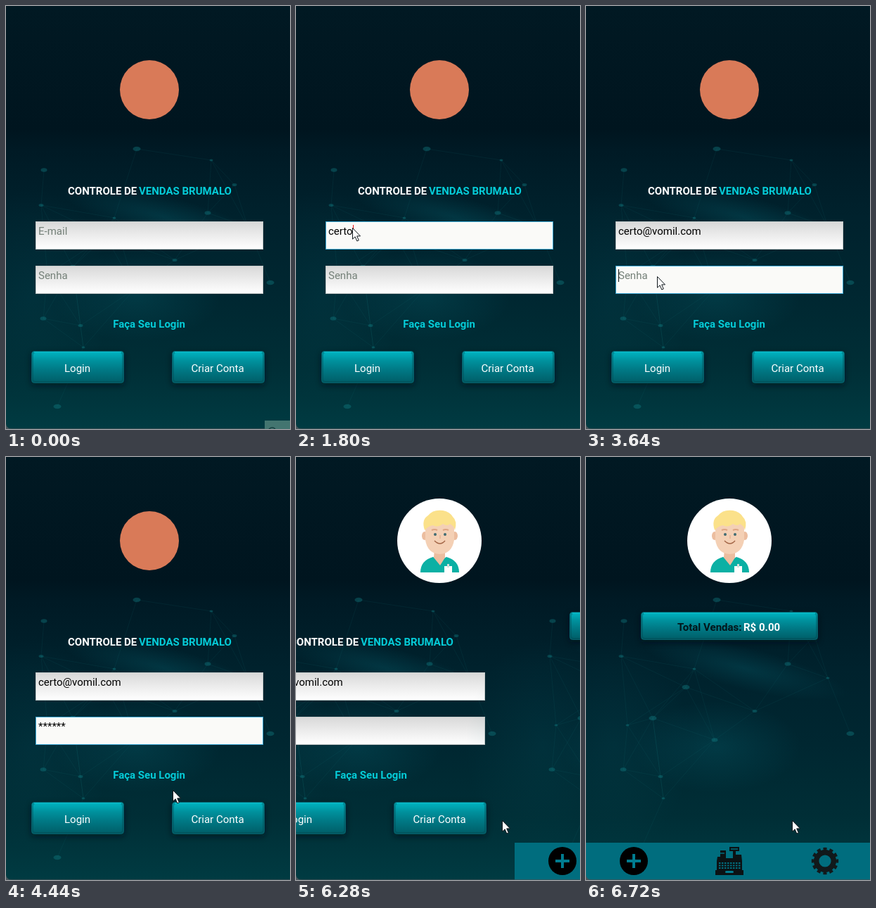
An HTML page for the animation above (6.84 s loop, 404 by 601 pixels).

```html
<!DOCTYPE html>
<html lang="pt-BR">
<head>
<meta charset="utf-8">
<title>Controle de Vendas</title>
<style>
  html, body { margin: 0; width: 100%; height: 100%; overflow: hidden; background: #001822; }
  svg { display: block; width: 404px; height: 601px; font: 15px Roboto, sans-serif; }
  text { white-space: pre; }
  .bold { font-weight: 700; }
  .mid { text-anchor: middle; }
  .cyan { fill: #05ccd8; }
  .white { fill: #fff; }
  .hint { fill: #748078; }
  .field { fill: url(#fieldFill); stroke: #c4c8c8; }
  .field.focus { fill: #fafaf8; stroke: #41acd9; }
  .face { fill: url(#teal); stroke: #07606b; }
  .pressed .face { fill: url(#dim); stroke: #2a5f60; }
  .pressed .shine { stroke: #4a8784; }
  .shine { fill: none; stroke: #08c5d3; stroke-width: 2; opacity: .75; }
  .edge { fill: none; stroke: #00464f; stroke-width: 2; opacity: .35; }
</style>
</head>
<body>
<svg viewBox="0 0 404 601">
  <defs>
    <linearGradient id="night" x2="0" y2="1">
      <stop stop-color="#011923"/><stop offset=".29" stop-color="#00151f"/>
      <stop offset=".34" stop-color="#001a25"/><stop offset=".5" stop-color="#00222d"/>
      <stop offset=".68" stop-color="#002731"/><stop offset=".85" stop-color="#002e36"/>
      <stop offset="1" stop-color="#003b42"/>
    </linearGradient>
    <radialGradient id="glow">
      <stop stop-color="#06606e" stop-opacity=".32"/><stop offset="1" stop-color="#06606e" stop-opacity="0"/>
    </radialGradient>
    <linearGradient id="fieldFill" x2="0" y2="1">
      <stop stop-color="#d8d8d8"/><stop offset=".5" stop-color="#ececec"/><stop offset="1" stop-color="#fff"/>
    </linearGradient>
    <linearGradient id="teal" x2="0" y2="1">
      <stop stop-color="#00b4c2"/><stop offset=".14" stop-color="#00a5b2"/>
      <stop offset=".3" stop-color="#00919d"/><stop offset=".6" stop-color="#007884"/>
      <stop offset="1" stop-color="#005d67"/>
    </linearGradient>
    <linearGradient id="dim" x2="0" y2="1">
      <stop stop-color="#427d7b"/><stop offset=".3" stop-color="#346463"/><stop offset="1" stop-color="#1f4445"/>
    </linearGradient>
    <filter id="soft" x="-10%" y="-30%" width="120%" height="160%"><feGaussianBlur stdDeviation="4"/></filter>
    <g id="backdrop">
      <rect width="408" height="601" fill="url(#night)"/>
      <ellipse cx="185" cy="412" rx="120" ry="65" fill="url(#glow)"/>
      <ellipse cx="225" cy="300" rx="150" ry="30" fill="url(#glow)" transform="rotate(14 225 300)"/>
      <ellipse cx="40" cy="410" rx="110" ry="150" fill="url(#glow)" opacity=".5"/>
      <g id="web" stroke="#1b7d82" stroke-width=".7"></g>
    </g>
  </defs>

  <g id="login">
    <use href="#backdrop"/>
    <text class="bold white" x="88" y="268">CONTROLE DE</text>
    <text class="bold cyan" x="189" y="268">VENDAS BRUMALO</text>
    <rect id="mailBox" class="field" x="42.5" y="306.5" width="323" height="39"/>
    <text id="mail" x="46" y="325"></text>
    <rect id="mailCaret" y="311" width="1" height="18" fill="#f01818"/>
    <rect id="passBox" class="field" x="42.5" y="369.5" width="323" height="39"/>
    <text id="pass" x="46" y="388"></text>
    <rect id="passCaret" y="374" width="1" height="18" fill="#111"/>
    <text class="bold cyan mid" x="203.5" y="457">Faça Seu Login</text>
    <g class="button" data-box="36 490 132 46"></g>
    <text class="white mid" x="101.5" y="520">Login</text>
    <g class="button" id="create" data-box="236 490 132 46"></g>
    <text class="white mid" x="301" y="520">Criar Conta</text>
  </g>

  <g id="home">
    <use href="#backdrop"/>
    <g class="button" data-box="78 220 252 40"></g>
    <text class="bold" x="130" y="247" fill="#02161b">Total Vendas:</text>
    <text class="bold white" x="224" y="247">R$ 0.00</text>
    <rect y="548" width="408" height="53" fill="#006d7e"/>
    <circle cx="68" cy="574" r="20"/>
    <path d="M58 574h20M68 564v20" stroke="#007c8f" stroke-width="4"/>
    <g fill="#0b1214">
      <path d="M204 554h14v6h-5v5h8l1 9v13h2v7h-40v-7h2v-13l1-6h4v-9h8v11h10v-10h-5z"/>
      <path d="M191 563h6M206 557h10" stroke="#006d7e" stroke-width="1.4"/>
      <path d="M189 577h31M189 580.5h31M189 584h31" stroke="#006d7e" stroke-width="2" stroke-dasharray="2.5 1.5"/>
      <rect x="198" y="588" width="12" height="3" rx="1.5" fill="#007c8f"/>
    </g>
    <g fill="none" stroke="#11191b" transform="translate(340 574)">
      <circle r="12.3" stroke-width="7.4"/>
      <circle r="17" stroke-width="4.4" pathLength="24" stroke-dasharray="1.15 .85" stroke-dashoffset=".57"/>
    </g>
  </g>

  <circle id="emblem" cx="204" cy="119" r="42" fill="#d97a58"/>
  <g id="avatar">
    <circle cx="204" cy="119" r="60" fill="#fff"/>
    <path d="M177 164q0-17 18-22l9 6 10-6q18 5 18 22z" fill="#0bb0a4"/>
    <path d="M197 130h15v13l-7 11-9-11z" fill="#ecbd9f"/>
    <ellipse cx="183" cy="112" rx="4" ry="6" fill="#ecbd9f"/>
    <ellipse cx="226" cy="112" rx="4" ry="6" fill="#ecbd9f"/>
    <path d="M184 91h41v27q-3 19-20.500 20-17.500-1-20.500-20z" fill="#f4d0b5"/>
    <path d="M183 104q-5-15 5-21 7-9 21-7 10 2 14 9 7 6 3 19-1-6-7-9-4 4-10 0-8 6-14 2-7 1-12 7z" fill="#fbe18a"/>
    <path d="M193 104q4-2 8 0M209 104q4-2 8 0" fill="none" stroke="#dda483" stroke-width="2"/>
    <circle cx="198" cy="110" r="2" fill="#416c73"/><circle cx="212" cy="110" r="2" fill="#416c73"/>
    <path d="M205 111v5" stroke="#e6b394" stroke-width="1.500"/>
    <path d="M197 119q8 8 15 0" fill="none" stroke="#a36647" stroke-width="1.500"/>
    <path d="M211 155h11v10h-11z" fill="#fff"/><path d="M215 152h3v5h-3z" fill="#d6dedc"/>
  </g>

  <path d="M0 594q1 6 8 7H0z" fill="#46545a"/>
  <path d="M5 600.5h399" stroke="#435357" opacity=".7"/>
  <g id="popup">
    <rect x="368" y="589" width="36" height="12" fill="#437570"/>
    <path d="M374 601q5-4 9 0" fill="none" stroke="#163f40" stroke-width="1.500"/>
  </g>
  <path id="cursor" d="M.5.5v15.700l3.600-3.400 2.700 6.200 2.500-1.100-2.600-6h4.800z" fill="#fff" stroke="#10181c"/>
</svg>
<script>
const LOOP = 6840, STEP = 40, WIDTH = 408, SLIDE = 6280;
const $ = id => document.getElementById(id);

const address = "certo@vomil.com";
const mailKeys = [1400, 1520, 1600, 1720, 1800, 2040, 2200, 2280, 2360, 2400, 2480, 2640, 2720, 2760, 2840];
const passKeys = [3720, 3840, 3960, 4040, 4120, 4200];
// start, end, destination x, y
const moves = [
  [40, 600, 134, 334],
  [880, 1120, 80, 315],
  [3120, 3520, 101, 384],
  [4200, 4600, 311, 521],
  [4640, 4840, 293, 516]
];

const nodes = [[292, 219], [186, 203], [54, 233], [325, 254], [154, 301], [142, 327], [287, 294], [50, 283],
  [59, 381], [95, 371], [53, 444], [106, 454], [110, 485], [376, 393], [183, 402], [240, 361], [344, 314], [73, 569]];
let web = "";
nodes.forEach(([x, y], i) => {
  for (const [u, v] of nodes.slice(i + 1))
    if (Math.hypot(u - x, v - y) < 115) web += `<path d="M${x} ${y}L${u} ${v}" opacity=".16"/>`;
  const r = 2.5 + i * 7 % 4;
  web += `<ellipse cx="${x}" cy="${y}" rx="${r}" ry="${r * .6}" fill="#14878c" stroke="none" opacity=".36"/>`;
});
$("web").innerHTML = web;

for (const button of document.querySelectorAll(".button")) {
  const [x, y, w, h] = button.dataset.box.split(" ").map(Number);
  const box = (inset, attrs) => `<rect x="${x + inset}" y="${y + inset}" width="${w - 2 * inset}" height="${h - 2 * inset}" rx="4" ${attrs}/>`;
  button.innerHTML = box(0, 'fill="#000e14" opacity=".6" filter="url(#soft)" transform="translate(0 3)"')
    + box(.5, 'class="face"') + box(2, 'class="edge"')
    + `<path class="shine" d="M${x + 4} ${y + 2}h${w - 8}"/>`;
}

const typed = (keys, t) => keys.filter(k => k <= t).length;
const show = (el, on) => el.style.display = on ? "" : "none";
const shift = (el, x, y = 0) => el.setAttribute("transform", `translate(${x} ${y})`);

function pointer(t) {
  let x = 341, y = 597;
  for (const [from, to, u, v] of moves) {
    const p = Math.min(1, Math.max(0, (t - from) / (to - from)));
    const e = p * p * (3 - 2 * p);
    x += (u - x) * e;
    y += (v - y) * e;
  }
  return [Math.round(x), Math.round(y)];
}

function input(name, value, hint, focus, caret) {
  const label = $(name);
  label.textContent = value || hint;
  label.setAttribute("class", value ? "" : "hint");
  $(name + "Box").classList.toggle("focus", focus);
  const bar = $(name + "Caret");
  show(bar, caret);
  bar.setAttribute("x", 46 + (value ? Math.round(label.getComputedTextLength()) : 0));
}

function draw(t) {
  const sliding = t >= SLIDE;
  const mailFocus = t >= 1160 && t < 3600, passFocus = t >= 3600 && !sliding;
  input("mail", address.slice(0, typed(mailKeys, t)), "E-mail", mailFocus, mailFocus);
  input("pass", "*".repeat(typed(passKeys, t)), "Senha", passFocus, passFocus && t < 3960);
  $("create").classList.toggle("pressed", t >= 4880 && !sliding);

  const x = sliding ? Math.min(WIDTH, Math.round(97 + (t - SLIDE) / 240 * (WIDTH - 97))) : 0;
  shift($("login"), -x);
  shift($("home"), WIDTH - x);
  show($("home"), sliding);
  show($("emblem"), !sliding);
  show($("avatar"), sliding);
  show($("popup"), t < 40);
  show($("cursor"), t >= 40);
  shift($("cursor"), ...pointer(t));
}

const start = performance.now();
function frame() {
  const t = (performance.now() - start) % LOOP;
  draw(Math.floor(t / STEP) * STEP);
  requestAnimationFrame(frame);
}
frame();
</script>
</body>
</html>
```
